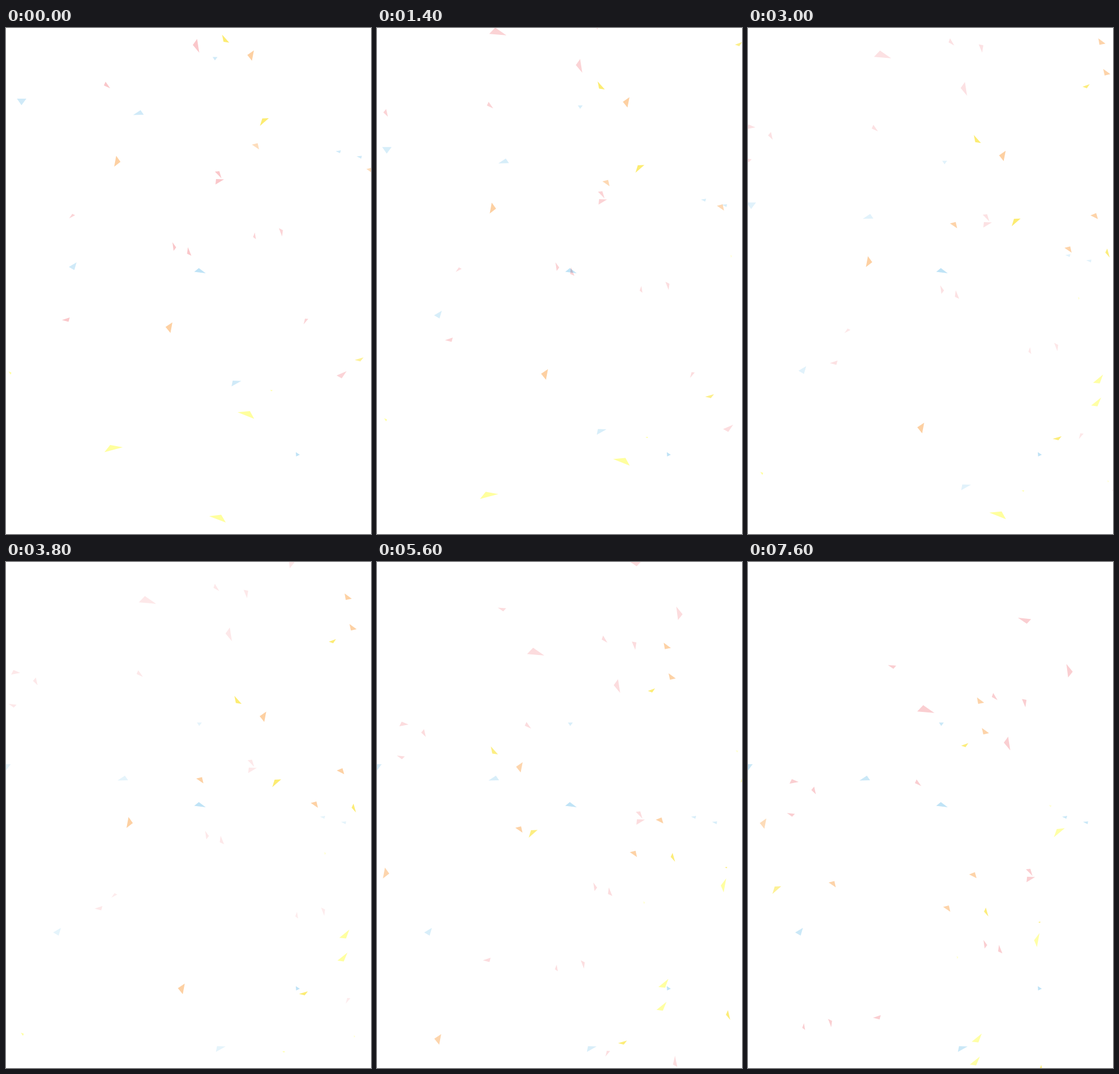
Animation of 636 by 881 pixels, one loop 7800 ms. Source, as an HTML page:

```html
<!DOCTYPE html>
<html lang="en">
<head>
<meta charset="utf-8">
<title>Confetti</title>
<style>
  html, body { margin: 0; height: 100%; overflow: hidden; background: #fff; }
  svg { display: block; width: 100%; height: 100%; }
  g { mix-blend-mode: multiply; }
  .pink { fill: #fac7ca; }
  .blue { fill: #bfe3f6; }
  .orange { fill: #fdd0a2; }
  .yellow { fill: #fcec72; }
  .pale { fill: #ffff9e; }
</style>
</head>
<body>
<svg viewBox="0 0 636 881">
  <g class="blue">
    <path d="M336 418l-8 6.5 20 2.5zM505 738.5l7 4.5-6.5 3z"/>
  </g>
  <g id="sky" class="blue">
    <path d="M19 123h16.5l-8.5 11.5zM234.5 143l5.5 8-18.5.5zM360 50.5h8.5l-4.5 6z
      M574.5 214.5l9-1.5-1.5 5zM611 223.5l9-1-1 5zM123 408l-13.5 8 9.5 5.5zM395 614l15 .5-17 9.5z"/>
  </g>
  <g id="rose" class="pink">
    <path d="M333 19l-7.5 10.5 11.2 13.5zM185-35.7l-10.5 11 30 2.5zM173.5 93.5l-3 6.5 11 5z
      M-5 106l-5 6 8 7.5zM-44 93l-4 8 16-3zM-52.5 152l9 6.5 5-5zM307-57l-2.5 7 10 5.5z
      M357-46.5l8 1.5-2 13zM434.5-107.5l11 13.5-8 10zM350-188l23 2.5-7.5 8z
      M123.5-105.5l14.5 1-5 5.5zM364 250l7.7-.7 3.8 12.5zM366 263l14 .5-15 9z
      M290 373l6.5 9-4.5 6zM317 381.5l-1.5 11.5 7.5 3.5zM97.5 508.5l13.5-4.5-2 7.5z"/>
  </g>
  <g id="blush" class="pink">
    <path d="M115.5 323.5l5 2.5-10.5 5.5zM433.5 356l-3 8 5 3.7zM475.5 348.5l7 3.5-1.5 11z
      M521 506l5.7.5-8.2 9.5zM593.5 597.5l-17.5 7.5 9 5zM639.7 514.5l-3.5 15.5 7.5 4z"/>
  </g>
  <g id="fall">
    <path class="orange" d="M432 39l-11.5 8 8 10zM192 222.5l7.5 10.5-11 8.5zM290 512.5l-12 8 8.5 10.5z"/>
    <path class="yellow" d="M376.5 11.5l12.5 14-10-1.5zM446.5 157.5l11.5-.5-15.5 13.5z"/>
    <path class="pale" d="M4.5 598l5 2-1.5 3.5zM460 630.5h4.5l-1.5 2zM403.5 669l21.5-2 7.5 13.5z
      M181.5 726l22 4-32 8.5zM354 850l21-2.5 8 13.5z"/>
  </g>
  <g id="drift">
    <path class="orange" d="M428.5 203l10-2.5 2.5 11zM628 245.5l10-2.5 2.5 11zM673.3 189l10-4 3 10.5z
      M687-119.3l12.5 9.3-10.5 2zM695.5-66l12.5 9-10 2.3z"/>
    <path class="yellow" d="M672-39.7l-12.5 4.5 7.5 2.8zM623 573.5l-15.5 4.5 10 2.5z
      M702.5 246.7l-3.3 7 7.7 8.6zM799 520.5l-3.5 8 7.5 9zM793.5 272l4-1-.5 2.5z"/>
    <path class="pale" d="M695.3 466l-17.5 14.3 11.7 1.2zM692 506l-17.5 14 11 1.5z
      M796 291l-9.5 12.5 5 12zM826 110l14-1.5-19 15.7z"/>
    <path class="pale" opacity=".5" d="M812.5 68l4.5 1-2 3zM651.5 331l3 2-2 3zM703 650l2.5 2-2 2z"/>
  </g>
</svg>
<script>
const HALF = 3800, STEP = 200, LOOP = 7800;

// Each group: [x, y, opacity] at the start, halfway and at the end.
const groups = {
  sky:   [[0, 0, .74], [-27.3, 229, .41], [-27.3, 229, .82]],
  rose:  [[0, 0, 1], [57, 95, .41], [120.3, 285, .87]],
  blush: [[0, 0, .76], [73.5, 253, .35], [-336, 447, .85]],
  fall:  [[0, 0, 1], [21.5, 221.5, 1], [-400, 407.5, .75]],
  drift: [[0, 0, .72], [-97, 174, .98], [-288, 355, .92]]
};

const start = performance.now();

function draw(now) {
  const t = Math.floor(Math.max(0, now - start) % LOOP / STEP) * STEP;
  const leg = t < HALF ? 0 : 1;
  const p = t / HALF - leg;
  for (const id in groups) {
    const from = groups[id][leg], to = groups[id][leg + 1];
    const [x, y, alpha] = from.map((v, i) => v + (to[i] - v) * p);
    const g = document.getElementById(id);
    g.setAttribute("transform", `translate(${x} ${y})`);
    g.setAttribute("opacity", alpha);
  }
  requestAnimationFrame(draw);
}
draw(start);
</script>
</body>
</html>
```
